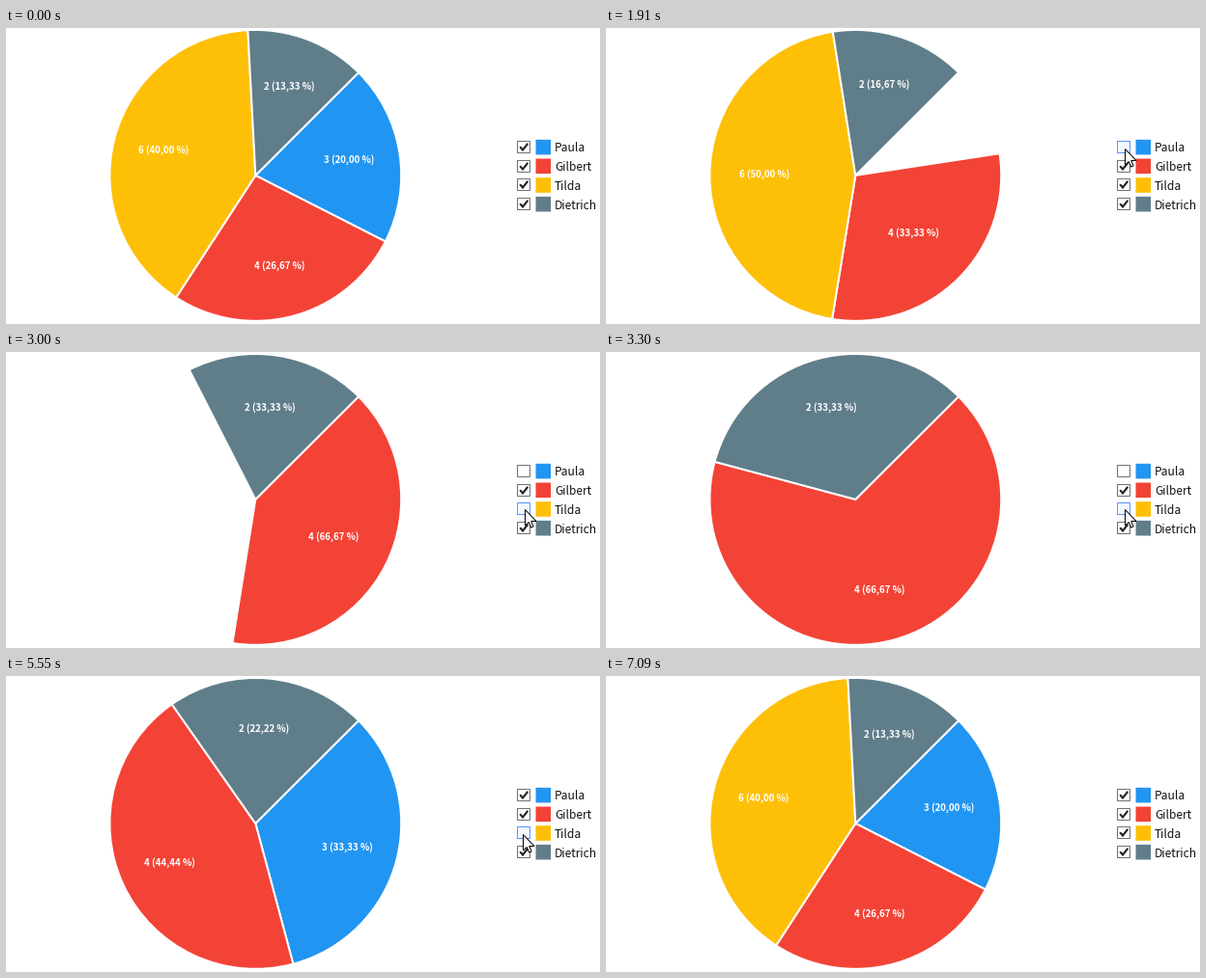
A matplotlib script for the animation above (7790 ms loop, 615 by 307 pixels).

```python
import numpy as np
import matplotlib.pyplot as plt
from matplotlib.animation import FuncAnimation
from matplotlib.patches import Polygon, Rectangle, Wedge

W, H, DPI = 615, 307, 100
PT = 72 / DPI                     # points per pixel
LOOP, STEP = 7790, 19
TICK, PHASE = 77.4, 45            # the screen refreshes on this beat

NAMES = ["Paula", "Gilbert", "Tilda", "Dietrich"]
VALUES = [3, 4, 6, 2]
COLORS = ["#2195f2", "#f34336", "#fec007", "#607d8a"]
FONT = "Noto Sans CJK JP"

CX, CY, RADIUS, LABEL_R = 258.3, 152.9, 150.9, 98
ROWS = 123.5 + 19.7 * np.arange(4)

# Each click (release time, row) toggles a slice; the chart reacts later
CLICKS = [(1498, 0), (2670, 2), (4456, 0), (5679, 2)]
PRESS, DELAY, GLIDE = 90, 256, 300

# Pointer moves: departure, arrival, where the tip ends up
START = (588, 288)
MOVES = [(520, 1060, 547, 100), (1060, 1210, 537, 125),
         (2140, 2450, 537, 163), (3854, 4080, 537, 125),
         (4624, 4840, 543, 162), (4850, 5160, 535, 164),
         (6320, 6780, 564, 312)]
ARROW = np.array([(0, 0), (0, 16.5), (3.8, 13), (6.2, 18.6), (8.6, 17.5),
                  (6.2, 12), (11.5, 12)]) + 0.5


def checked(row, t):
    return sum(r == row and t >= at for at, r in CLICKS) % 2 == 0


def shown(row, t):
    """A slice goes at once but returns only when the chart reacts."""
    return checked(row, t) and checked(row, t - DELAY)


def layout(active, previous):
    """Start angle, sweep and label spot per slice; inactive ones keep theirs."""
    result = previous.copy()
    total = sum(VALUES[i] for i in active)
    angle = -45.0
    for i in active:
        sweep = 360 * VALUES[i] / total
        mid = np.radians(angle + sweep / 2)
        result[i] = (angle, sweep, CX + LABEL_R * np.cos(mid),
                     CY + LABEL_R * np.sin(mid))
        angle += sweep
    return result


groups = [range(4)]
layouts = [layout(groups[0], np.zeros((4, 4)))]
for at, _ in CLICKS:
    groups.append([i for i in range(4) if checked(i, at)])
    layouts.append(layout(groups[-1], layouts[-1]))

fig = plt.figure(figsize=(W / DPI, H / DPI), dpi=DPI, facecolor="white")
ax = fig.add_axes([0, 0, 1, 1])
ax.set_xlim(0, W)
ax.set_ylim(H, 0)
ax.axis("off")

slices, labels, boxes, marks = [], [], [], []
for i, (name, color, row) in enumerate(zip(NAMES, COLORS, ROWS)):
    slices.append(ax.add_patch(Wedge(
        (CX, CY), RADIUS, 0, 90, fc=color, ec="white", lw=2 * PT,
        joinstyle="round", zorder=1 + i)))
    labels.append(ax.text(
        0, 0, "", color="white", size=9.7 * PT, family=FONT, weight="bold",
        ha="center", va="baseline", zorder=6))
    top = np.round(row - 6.5) + 0.5
    boxes.append(ax.add_patch(Rectangle(
        (529.5, top), 13, 12, lw=PT, snap=False, zorder=6)))
    marks += ax.plot([532.2, 535, 540.3], top + np.array([5.7, 9, 2.3]),
                     color="#212121", lw=2.1 * PT, zorder=7,
                     solid_joinstyle="miter", solid_capstyle="butt")
    ax.add_patch(Rectangle((548.5, row - 7.7), 15.6, 15.6, fc=color, lw=0,
                           snap=False))
    ax.text(568, row + 4.95, name, size=12 * PT, family=FONT, color="#111111")
pointer = ax.add_patch(Polygon(ARROW, fc="white", ec="black", lw=PT, zorder=9))


def pointer_at(t):
    if t < MOVES[0][0] - TICK / 2:
        return np.array((0, H + 20))
    tip = np.array(START, float)
    for leave, arrive, x, y in MOVES:
        p = np.clip((t - leave) / (arrive - leave), 0, 1)
        tip += p * ((x, y) - tip)
    return tip


def draw_chart(t):
    phase = sum(t >= at + DELAY for at, _ in CLICKS)
    now = layouts[phase]
    if phase:
        p = min(1, (t - CLICKS[phase - 1][0] - DELAY) / GLIDE)
        now = layouts[phase - 1] * (1 - p) + now * p
    total = sum(VALUES[i] for i in groups[phase])
    for i, (angle, sweep, x, y) in enumerate(now):
        visible = shown(i, t)
        slices[i].set_visible(visible)
        labels[i].set_visible(visible)
        slices[i].set_theta1(angle)
        slices[i].set_theta2(angle + sweep)
        share = f"{100 * VALUES[i] / total:.2f}".replace(".", ",")
        labels[i].set_text(f"{VALUES[i]} ({share} %)")
        labels[i].set_position((x, y + 3.3))


def draw_legend(t, x, y):
    for i, row in enumerate(ROWS):
        face, edge = "white", "#707070"
        if abs(x - 536) <= 8 and abs(y - row) <= 7:
            face, edge = "#f3f9ff", "#5593ff"
        if any(r == i and at - PRESS <= t < at for at, r in CLICKS):
            face, edge = "#d9ecff", "#3c77dd"
        boxes[i].set_facecolor(face)
        boxes[i].set_edgecolor(edge)
        marks[i].set_visible(checked(i, t))


def draw(n):
    t = PHASE + TICK * np.floor((n * STEP + STEP - 1 - PHASE) / TICK)
    x, y = np.round(pointer_at(t))
    draw_chart(t)
    draw_legend(t, x, y)
    pointer.set_xy(ARROW + (x, y))
    return []


anim = FuncAnimation(fig, draw, frames=LOOP // STEP, interval=STEP,
                     init_func=lambda: draw(0), repeat=True, repeat_delay=0)
plt.show()
```
